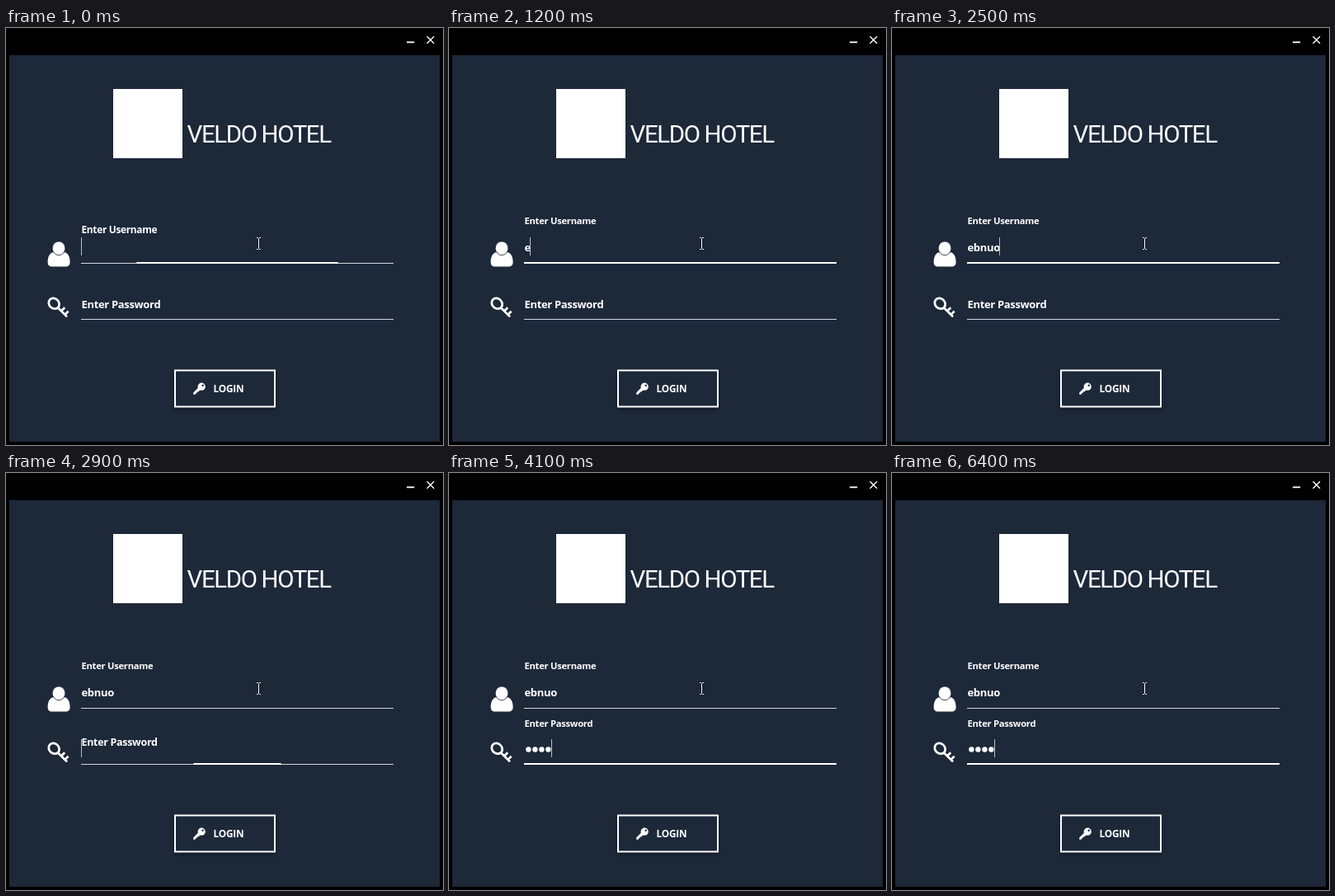
An HTML page for the animation above (8000 ms loop, 530 by 506 pixels).

```html
<!DOCTYPE html>
<html lang="en">
<head>
<meta charset="utf-8">
<title>Login</title>
<style>
  html, body { margin: 0; width: 100%; height: 100%; overflow: hidden; background: #000; }
  svg { display: block; width: 530px; height: 506px; }
  text { fill: #fff; font: 700 13px "Open Sans", "Noto Sans", sans-serif; letter-spacing: -.33px; white-space: pre; }
  .brand { font: 400 29.5px Roboto, "Open Sans", sans-serif; letter-spacing: -1.4px; }
  .login { font-size: 11.8px; letter-spacing: -.2px; }
  .thin { fill: #d3d7dc; }
  .caret { fill: #b9bfc8; }
  .line { fill: none; stroke: #fff; }
</style>
</head>
<body>
<svg viewBox="0 0 530 506" fill="#fff">
  <defs>
    <filter id="soft" x="-10%" y="-20%" width="120%" height="150%">
      <feGaussianBlur stdDeviation="2"/>
    </filter>
  </defs>
  <rect width="530" height="506" fill="#000"/>
  <rect x="4" y="33" width="522" height="469" fill="#1d2839"/>
  <path class="line" stroke-width="1.8" d="M486 17.3h9.2"/>
  <path class="line" stroke-width="1.4" d="M510.5 10.2l8.6 8.6m0-8.6l-8.6 8.6"/>

  <rect x="130" y="74" width="84" height="84"/>
  <text class="brand" x="219.5" y="139">VELDO HOTEL</text>

  <!-- user -->
  <path d="M57.6 272C52.5 272.7 50.6 278.5 50.6 284c0 3.7 2 5.6 5.3 5.6h16.200c3.400 0 5.500-1.900 5.500-5.600 0-5.500-1.900-11.300-7-12-3.700 4.200-9.300 4.200-13 0z"/>
  <ellipse cx="64" cy="267.300" rx="7.800" ry="8.400" stroke="#1d2839" stroke-width=".8"/>

  <!-- key -->
  <g class="line" stroke-width="2.700">
    <ellipse cx="58.200" cy="334.300" rx="6.900" ry="5.900" transform="rotate(45 58.200 334.300)"/>
    <path d="M62.800 339.200L74 350.400M67 343.500l4.200-4.200M71.400 347.900l4.200-4.200"/>
  </g>

  <rect x="91" y="285" width="379" height="1" class="thin"/>
  <rect x="91" y="353" width="379" height="1" class="thin"/>
  <rect id="userLine" y="284" height="2"/>
  <rect id="passLine" y="352" height="2"/>
  <text id="userLabel">Enter Username</text>
  <text id="passLabel">Enter Password</text>
  <text id="userText" x="91.5" y="270.7"></text>
  <g id="dots"></g>
  <rect id="caret" class="caret" width="1" height="22"/>

  <!-- button -->
  <rect x="204" y="417" width="123" height="46" fill="#000" opacity=".35" filter="url(#soft)"/>
  <rect x="205" y="415.5" width="121" height="44" fill="#1d2839" stroke="#fff" stroke-width="2"/>
  <circle cx="237.2" cy="435.2" r="4.600"/>
  <circle cx="238.700" cy="433.700" r="1.200" fill="#1d2839"/>
  <path d="M233.500 436l-6.300 6.500v2.300h2.600v-1.500h1.700v-1.700h1.700l3-2.800z"/>
  <text class="login" x="251.500" y="441.500">LOGIN</text>

  <!-- pointer -->
  <g class="line" transform="translate(306.500 261.500)">
    <path stroke="#000" stroke-width="2.400" opacity=".35" d="M0-6V6"/>
    <path d="M-2.500-7H-1L0-6 1-7h1.500M0-6V6M-2.500 7H-1L0 6 1 7h1.500"/>
  </g>
</svg>
<script>
const LOOP = 8000;
const USER = "ebnuo";
const $ = id => document.getElementById(id);

// [time, value] steps, each held until the next
const steps = {
  userFloat: [[0, .645], [100, 1]],
  userFocus: [[0, .645], [100, 1], [2900, 0]],
  passFloat: [[0, 0], [2900, .28], [3000, .74], [3100, 1]],
  letters: [[0, 0], [1200, 1], [1300, 2], [1400, 3], [2200, 4], [2400, 5]],
  dots: [[0, 0], [3700, 1], [3800, 2], [4000, 3], [4100, 4]],
  caret: [[0, 1], [400, 0], [900, 1], [1900, 0], [2200, 1], [3400, 0], [3700, 1]]
};

function at(name, t) {
  let value = 0;
  for (const [time, v] of steps[name]) if (t >= time) value = v;
  return value;
}

function floatLabel(el, baseline, rise, p) {
  el.setAttribute("transform", `translate(91.5 ${baseline - rise * p}) scale(${1 - .135 * p})`);
}

function growLine(el, p) {
  el.setAttribute("x", 280.5 - 189.5 * p);
  el.setAttribute("width", 379 * p);
}

const dots = [0, 1, 2, 3].map(i => {
  const c = document.createElementNS("http://www.w3.org/2000/svg", "circle");
  c.setAttribute("cx", 96.4 + 8 * i);
  c.setAttribute("cy", 335.5);
  c.setAttribute("r", 3.2);
  return $("dots").appendChild(c);
});

function draw(t) {
  const pass = at("passFloat", t);
  floatLabel($("userLabel"), 270.5, 33, at("userFloat", t));
  floatLabel($("passLabel"), 339.5, 31.5, pass);
  growLine($("userLine"), at("userFocus", t));
  growLine($("passLine"), pass);

  const text = USER.slice(0, at("letters", t));
  const field = $("userText");
  if (field.textContent !== text) field.textContent = text;

  const count = at("dots", t);
  dots.forEach((c, i) => c.setAttribute("visibility", i < count ? "visible" : "hidden"));

  const inPass = t >= 2900;
  const shift = inPass ? 8.2 * count : text ? field.getComputedTextLength() : 0;
  $("caret").setAttribute("x", Math.round(91 + shift));
  $("caret").setAttribute("y", inPass ? 323 : 254);
  $("caret").setAttribute("opacity", at("caret", t));
}

const start = performance.now();
function tick() {
  draw((performance.now() - start) % LOOP);
  requestAnimationFrame(tick);
}
tick();
</script>
</body>
</html>
```
